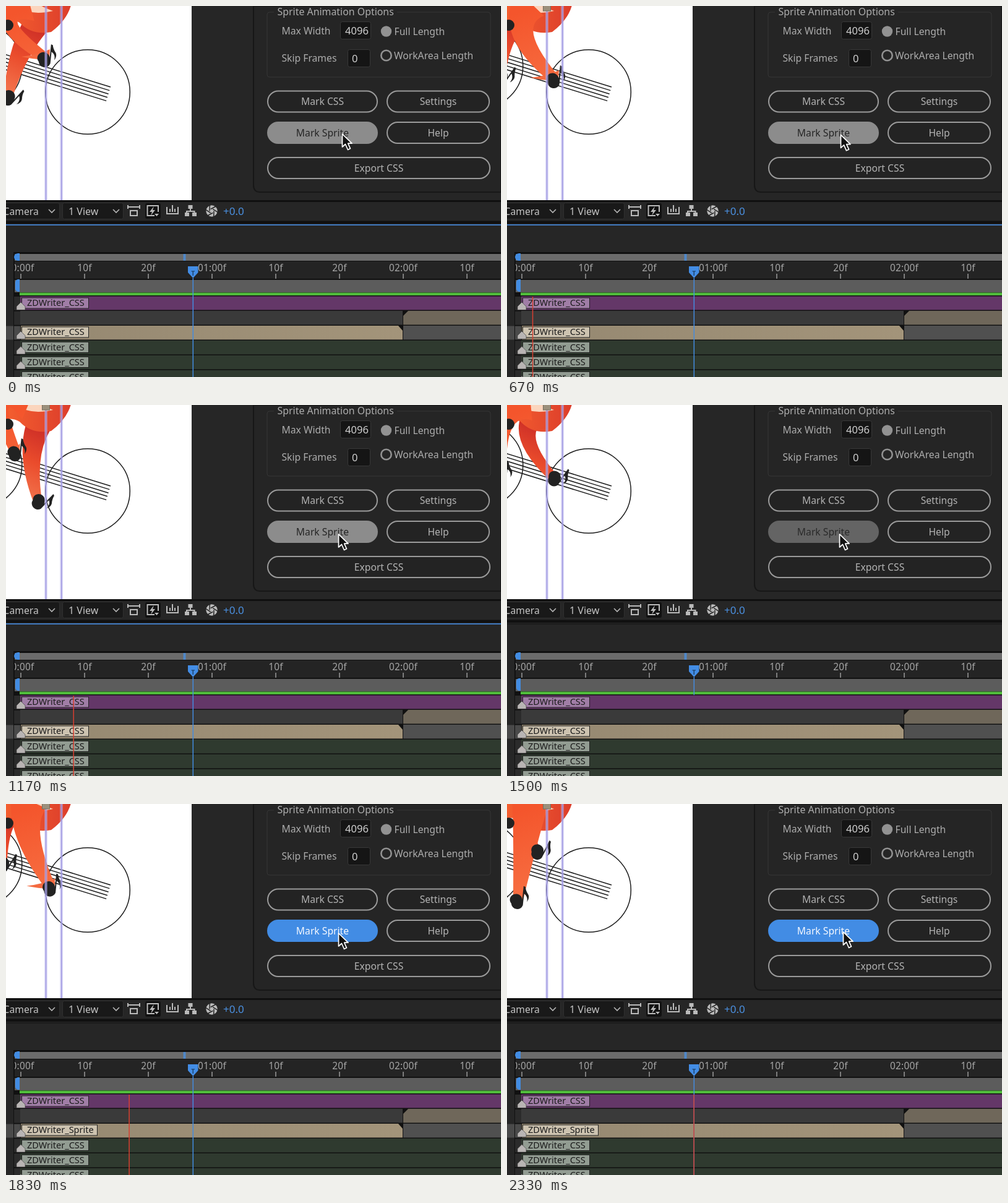
Animation of 800 by 600 pixels, one loop 2410 ms. Source, as an HTML page:

```html
<!DOCTYPE html>
<html lang="en">
<head>
<meta charset="utf-8">
<title>Sprite panel</title>
<style>
html, body { margin: 0; width: 100%; height: 100%; overflow: hidden; background: #262626; }
svg { display: block; font-family: "Noto Sans", "Open Sans", sans-serif; font-size: 15.7px; }
</style>
</head>
<body>
<svg id="stage" width="800" height="600" viewBox="0 0 800 600">
  <defs>
    <linearGradient id="backFur" gradientUnits="userSpaceOnUse" x1="90" y1="0" x2="15" y2="155">
      <stop offset="0" stop-color="#e9502f"/><stop offset=".3" stop-color="#cf3027"/>
      <stop offset=".6" stop-color="#ea4c2c"/><stop offset="1" stop-color="#f47a52"/>
    </linearGradient>
    <linearGradient id="frontFur" gradientUnits="userSpaceOnUse" x1="20" y1="10" x2="60" y2="150">
      <stop offset="0" stop-color="#f4552c"/><stop offset="1" stop-color="#f77043"/>
    </linearGradient>
    <linearGradient id="bodyFur" x1="0" x2="1"><stop offset="0" stop-color="#f5602f"/><stop offset="1" stop-color="#dc3d2b"/></linearGradient>
    <linearGradient id="tan" x1="0" x2="1"><stop offset="0" stop-color="#958871"/><stop offset="1" stop-color="#a3947a"/></linearGradient>
    <clipPath id="viewClip"><rect width="300" height="314"/></clipPath>
    <clipPath id="rulerClip"><rect x="14" y="413" width="786" height="28"/></clipPath>
  </defs>
  <rect width="800" height="600" fill="#262626"/>

  <g clip-path="url(#viewClip)">
    <rect width="300" height="314" fill="#fff"/>
    <g id="bike" fill="none" stroke="#1c1c1c" stroke-width="1.5">
      <circle cx="132" cy="139" r="68.3"/><circle cx="-42.5" cy="97" r="68.3"/>
    </g>
    <path id="backLeg" fill="url(#backFur)"/>
    <path fill="url(#bodyFur)" d="M-5-5H106Q100 22 73 42Q42 48 22 27Q10 20-5 24Z"/>
    <path fill="#fbd5bd" d="M14-2Q36 17 76 8Q62 3 54-2Z"/>
    <path id="frontLeg" fill="url(#frontFur)"/>
    <path id="toe" fill="#f46a40"/>
    <circle cx="3" cy="31" r="9" fill="#222"/>
    <g id="notes" fill="#222"></g>
    <path fill="#b9b4ee" fill-opacity=".45" d="M62 0h5v314h-5zM87 0h5v314h-5z"/>
    <path stroke="#9d96e2" stroke-width="1.6" d="M64.5 0V314M89.7 0V314"/>
    <rect id="handle" x="58.5" y="-3" width="12" height="11" fill="#9b907c" stroke="#766d5d"/>
  </g>

  <path d="M400 0V290Q400 301 411 301H800V0Z" fill="#252525" stroke="#171717" stroke-width="2"/>
  <path d="M433 10H426Q422 10 422 14V111Q422 115 426 115H779Q783 115 783 111V14Q783 10 779 10H632" fill="none" stroke="#363636"/>
  <g fill="#151515" stroke="#383838"><rect x="540.5" y="25.5" width="49" height="28" rx="3"/><rect x="552.5" y="70.5" width="36" height="28" rx="3"/></g>
  <g fill="#adadad">
    <text x="438.5" y="14.5" font-size="15.9">Sprite Animation Options</text>
    <text x="445.5" y="46">Max Width</text>
    <text x="445.5" y="90">Skip Frames</text>
    <text x="627.5" y="46.5">Full Length</text>
    <text x="627" y="86">WorkArea Length</text>
    <g fill="#d0d0d0" font-size="16.6"><text x="548" y="46">4096</text><text x="559" y="90.5">0</text></g>
  </g>
  <circle cx="614.5" cy="41" r="8.7" fill="#929292"/>
  <circle cx="614.5" cy="80" r="8.2" fill="none" stroke="#929292" stroke-width="2.6"/>
  <g id="buttons" text-anchor="middle"></g>

  <path fill="#101010" d="M0 314H800V317H0ZM0 347.5H800V352H0Z"/>
  <rect id="focus" y="353" width="800" height="2"/>
  <g fill="#191919" stroke="#303030"><rect x="-6.5" y="318.500" width="93" height="26" rx="3"/><rect x="91.500" y="318.500" width="98" height="26" rx="3"/></g>
  <g fill="#c4c4c4"><text x="-4.5" y="338">Camera</text><text x="101" y="338" font-size="16">1 View</text></g>
  <path fill="none" stroke="#b5b5b5" stroke-width="1.6" d="M69 329l5 5 5-5M173 329l5 5 5-5"/>
  <rect x="225" y="319" width="25" height="25" rx="3" fill="#111"/>
  <g id="icons" fill="none" stroke="#bababa" stroke-width="2">
    <path d="M197 322v6M216 322v6M197 325H216M201 331H212V339H201Z"/>
    <path d="M240 339H228.500V323H246V333"/>
    <path d="M260 325V336H278V325M265 328v5M269 322v11M273 328v5"/>
    <path d="M298 327v5M292 336V332H304.500V336"/>
    <g fill="#bababa" stroke="none">
      <path d="M239 324l-7 9h4l-2 6 7-9h-4zM240 336h7l-3.500 4z"/>
      <path d="M294.500 322h7v6h-7zM289 334h7v6h-7zM301 334h7v6h-7z"/>
      <circle cx="332.500" cy="331.500" r="9.200"/>
    </g>
  </g>
  <text x="351" y="338" font-size="17" font-weight="500" fill="#4b91e2">+0.0</text>

  <path fill="#111" d="M12 398H800V600H12Z"/>
  <rect x="14" y="401" width="786" height="11" fill="#6b6b6b"/>
  <rect x="286.500" y="401" width="4" height="11" fill="#4f87c8"/>
  <rect x="14" y="413" width="786" height="28" fill="#242424"/>
  <g id="ruler" clip-path="url(#rulerClip)" font-size="15.400" letter-spacing=".25" fill="#a5a5a5"></g>
  <rect x="14" y="443" width="786" height="20" fill="#5c5c5c"/>
  <rect x="22" y="463.500" width="778" height="4.500" fill="#51bd3c"/>
  <path fill="#428ce2" d="M22 400v12h-3q-6-1-6-6t6-6zM22 442v20h-3q-4-1-4-5v-10q0-4 4-5z"/>
  <g id="rows"></g>
  <g id="markers" font-size="14.500"></g>
  <path id="needle" fill="none" stroke="#438be0" stroke-width="1.500"/>
  <path id="preview" fill="none" stroke="#d93f31" stroke-width="1.500"/>
  <path fill="#438de5" d="M294 421h16.500v10l-8.200 9-8.300-9z"/>
  <path fill="none" stroke="#17324f" stroke-width="1.200" d="M299.500 429h5.500M302.200 429v7"/>
  <path id="cursor" fill="#111" stroke="#fff" stroke-width="1.700" stroke-linejoin="round" d="M0 0V21L5 16.500 9 25.500 13 23.600 9.200 15.200H15.500Z"/>
</svg>
<script>
const LOOP = 2410, STEP = 1000 / 12;
const $ = id => document.getElementById(id);
const set = (el, attrs) => { for (const k in attrs) el.setAttribute(k, attrs[k]); return el; };

function add(parent, tag, attrs, text) {
  const el = set(document.createElementNS("http://www.w3.org/2000/svg", tag), attrs);
  if (text) el.textContent = text;
  return $(parent).appendChild(el);
}

// Piecewise linear curve through [step, value] pairs.
function track(keys, x) {
  if (x <= keys[0][0]) return keys[0][1];
  for (let n = 1; n < keys.length; n++) {
    const [x0, y0] = keys[n - 1], [x1, y1] = keys[n];
    if (x <= x1) return y0 + (y1 - y0) * (x - x0) / (x1 - x0);
  }
  return keys[keys.length - 1][1];
}

for (let n = 0; n < 5; n++) {
  add("bike", "path", { d: `M-20 ${72.5 + n * 6.1}L${169 - n * 1.7} ${131 + n * 5.6}` });
}

function button(label, x, y, w) {
  const box = add("buttons", "rect", { x, y, width: w, height: 34, rx: 17, fill: "#232323", stroke: "#9b9b9b", "stroke-width": 2 });
  const text = add("buttons", "text", { x: x + w / 2, y: y + 22.5, fill: "#b3b3b3" }, label);
  return { box, text };
}
button("Mark CSS", 423, 137.5, 177);
button("Settings", 616, 137.5, 165);
button("Help", 616, 188, 165);
button("Export CSS", 423, 245, 359);
const sprite = button("Mark Sprite", 423, 188, 177);

for (let n = 0; n < 6; n++) {
  const a = n * Math.PI / 3, b = a + 1.25;
  add("icons", "path", { stroke: "#262626", "stroke-width": 1.5,
    d: `M${332.5 + 3.5 * Math.cos(a)} ${331.5 + 3.5 * Math.sin(a)}L${332.5 + 10 * Math.cos(b)} ${331.5 + 10 * Math.sin(b)}` });
}

["0:00f", "10f", "20f", "01:00f", "10f", "20f", "02:00f", "10f"].forEach((label, n) => {
  const x = 24 + n * 103;
  add("ruler", "text", { x: n ? x : 27, y: 429, "text-anchor": "middle" }, label);
  add("ruler", "rect", { x: x - .7, y: 433, width: 1.4, height: 8 });
});

const row = (x, y, w, h, fill) => add("rows", "rect", { x, y, width: w, height: h, fill });
for (let n = 0; n < 6; n++) {
  const y = 470 + n * 23.8;
  row(0, y, 12, 22, n == 2 ? "#4a4a4a" : "#262626");
  row(13, y, 10, 22, n == 2 ? "#4a4a4a" : "#2b2b2b");
}
row(23, 469.5, 777, 22, "#643768");
row(23, 493, 618, 22.5, "#3a3a3a");
row(642, 493, 158, 22.5, "#6f675a");
row(24, 517, 617, 22.5, "url(#tan)");
row(642, 517, 158, 22.5, "#505050");
for (let n = 0; n < 3; n++) row(23, 541 + n * 24, 777, 22.5, "#2f3a2f");
add("rows", "path", { fill: "#111", d: "M634 517h7v8zM642 493h8l-8 8z" });

function marker(y, fill) {
  const box = add("markers", "rect", { x: 25.5, y: y + .5, width: 108, height: 17, fill, stroke: "#242424" });
  const text = add("markers", "text", { x: 34, y: y + 13.5, fill: "#1b1b1b" }, "ZDWriter_CSS");
  add("markers", "path", { d: `M17 ${y + 20}v-5.500l7-7 7 7v5.500z`, fill: "#b9b5b4", stroke: "#333", "stroke-width": .6 });
  return { box, text };
}
marker(471.5, "#a07da6");
const layer = marker(518.5, "#cdc3b0");
for (let n = 0; n < 3; n++) marker(543 + n * 24, "#929c92");

const [backNote, frontNote] = [0, 1].map(() => add("notes", "path", {
  d: "M-10 1A10 9.500 0 1 1 7-7V-29L10-28Q11-22 16-16Q19-11 15-4Q16-13 9-17V2A9.700 9.500 0 0 1-10 1Z" }));

// Two-bone tapered limb from hip to foot with the knee bent to the left.
function limb(el, hip, foot, thigh, shin, widths) {
  const dx = foot[0] - hip[0], dy = foot[1] - hip[1], real = Math.hypot(dx, dy);
  const dist = Math.min(real, thigh + shin), ux = dx / real, uy = dy / real;
  const along = (dist * dist + thigh * thigh - shin * shin) / (2 * dist);
  const out = Math.sqrt(Math.max(0, thigh * thigh - along * along));
  const knee = [hip[0] + ux * along - uy * out, hip[1] + uy * along + ux * out];
  const bend = knee.map((v, n) => v * 1.5 - (hip[n] + foot[n]) / 4);
  const edge = (p, q, w, s) => {
    const x = q[0] - p[0], y = q[1] - p[1], len = Math.hypot(x, y);
    return [-y / len * w * s, x / len * w * s];
  };
  const side = s => [[hip, bend], [hip, foot], [bend, foot]].map(([p, q], n) => {
    const o = edge(p, q, widths[n], s), at = [hip, bend, foot][n];
    return `${at[0] + o[0]} ${at[1] + o[1]}`;
  });
  const a = side(1), b = side(-1);
  set(el, { d: `M${a[0]}Q${a[1]} ${a[2]}L${b[2]}Q${b[1]} ${b[0]}Z` });
}

const crankKeys = [[8, 94], [11, 22], [18, -88], [22, -243], [25, -319], [28, -518]];
const previewKeys = [[8, 1.7], [11, 5], [22, 17], [25, 21], [28, 27]];
const cursorKeys = [[6, 0], [9, 1], [25, 1], [28, 0]];

function draw(t) {
  const i = Math.floor((t + 4) / STEP);
  const playing = i >= 8, clicking = i >= 17 && i < 20, done = i >= 20;

  const degrees = playing ? track(crankKeys, i) : 44 + i * .8;
  const angle = degrees * Math.PI / 180;
  const pedal = s => [33 + s * 43 * Math.sin(angle), 121 - s * 43 * Math.cos(angle)];
  const front = pedal(1), back = pedal(-1);
  limb($("backLeg"), [80, -4], [back[0], back[1] - 4], 75, 100, [25, 21, 7]);
  limb($("frontLeg"), [38, -5], [front[0] + 1, front[1] - 6], 55, 95, [30, 22, 8]);
  const [x, y] = front, reach = 38 * Math.min(1, 1.5 * Math.max(0, Math.sin(angle + .35)));
  set($("toe"), { d: `M${x + 8} ${y - 20}Q${x - reach * .3} ${y - 11} ${x - reach} ${y - 8}Q${x - reach * .4} ${y - 3} ${x + 7} ${y - 4}Z` });
  set(frontNote, { transform: `translate(${front}) rotate(6)` });
  set(backNote, { transform: `translate(${back}) rotate(${36 + 9 * Math.cos(angle)})` });
  set($("handle"), { visibility: playing ? "visible" : "hidden" });

  const fill = done ? "#428ce4" : clicking ? "#646464" : "#8c8c8c";
  set(sprite.box, { fill, stroke: fill });
  set(sprite.text, { fill: done ? "#f4f8ff" : clicking ? "#2a2a2a" : "#252525" });
  layer.text.textContent = done ? "ZDWriter_Sprite" : "ZDWriter_CSS";
  set(layer.box, { width: done ? 122 : 108 });
  set($("focus"), { fill: i < 17 ? "#3f78bd" : "#1b1b1b" });

  const shift = track(cursorKeys, i);
  set($("cursor"), { transform: `translate(${543.5 - 6 * shift} ${207 + 2 * shift})` });
  set($("needle"), { d: `M302.300 440V${clicking ? 469 : 600}` });
  const px = 24 + 10.3 * track(previewKeys, i);
  set($("preview"), { d: `M${px} 470V600`, visibility: playing && !clicking ? "visible" : "hidden" });
}

const start = performance.now();
function tick() {
  draw((performance.now() - start) % LOOP);
  requestAnimationFrame(tick);
}
tick();
</script>
</body>
</html>
```
